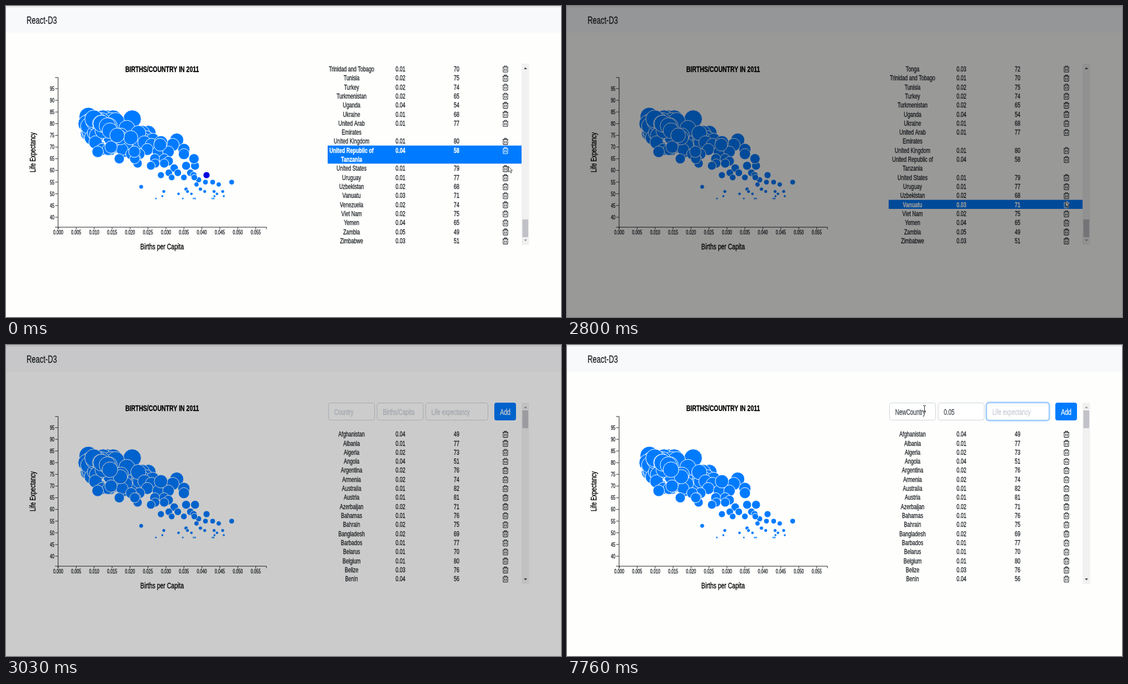
An HTML page with a canvas that plays this animation: 999x561 px, repeating every 8 s.

```html
<!DOCTYPE html>
<html lang="en">
<head>
<meta charset="utf-8">
<title>Births per country</title>
<style>
  html, body { margin: 0; width: 100%; height: 100%; overflow: hidden; background: #fefefd; }
  canvas { display: block; }
</style>
</head>
<body>
<canvas id="stage" width="999" height="561"></canvas>
<script>
const ctx = document.getElementById('stage').getContext('2d');
const LOOP = 8000, CONDENSED = 0.72, LINE = 16.32;
const BLUE = '#007bff', INK = '#212529';
const DELETE_AT = 2260, SCENE_AT = 2890, KEYS_ON = 4160, KEYS_OFF = 5730;

// name, births per thousand, life expectancy; "/" breaks the line
const parse = text => text.trim().split('\n').map(line => {
  const [name, births, life] = line.trim().split(',');
  return { name, lines: name.split('/'), births: +births, life: +life };
});
const firstRows = parse(`Afghanistan,43.5,49
  Albania,12.8,77
  Algeria,20.5,73
  Angola,43.4,51
  Argentina,17.1,76
  Armenia,15.1,74
  Australia,13.7,82
  Austria,9.2,81
  Azerbaijan,18.3,71
  Bahamas,14.9,76
  Bahrain,19,75
  Bangladesh,20.3,69
  Barbados,12,77
  Belarus,11.5,70
  Belgium,11.8,80
  Belize,25.1,76
  Benin,39.1,56`);
const lastRows = parse(`Tonga,28.6,72
  Trinidad and Tobago,14.7,70
  Tunisia,17.5,75
  Turkey,17.3,74
  Turkmenistan,21.3,65
  Uganda,44.7,54
  Ukraine,11,68
  United Arab/Emirates,12.4,77
  United Kingdom,12.1,80
  United Republic of/Tanzania,41.3,58
  United States,13.7,79
  Uruguay,14.4,77
  Uzbekistan,21.2,68
  Vanuatu,28.4,71
  Venezuela,20.2,74
  Viet Nam,16.4,75
  Yemen,37.8,65
  Zambia,46.1,49
  Zimbabwe,29.4,51`);
const afterDelete = lastRows.filter(r => r.name !== 'Venezuela');
const removedLater = ['Uzbekistan', 'Vanuatu', 'Venezuela', 'Viet Nam', 'Yemen'];
const remaining = lastRows.filter(r => !removedLater.includes(r.name));

// each group: life expectancy followed by birth rates
const expand = groups => groups.flatMap(([life, ...rates]) => rates.map(births => ({ births, life })));
const longLived = expand([
  [83, 8.4], [82, 20.6, 15.3, 12.5], [81, 9, 14.6, 16, 12], [80, 7.9, 9.4], [76, 8.3],
]);
const shortLived = expand([
  [82, 9.9], [80, 11.9], [78, 19.1], [75, 10.7], [76, 22.3],
  [73, 26.3, 33], [72, 10.4, 24], [71, 26, 31.9, 18.9],
  [69, 12.2, 13.9, 17.8, 35, 24.8], [68, 27.8, 30.7], [67, 22.6, 20.3, 35],
  [65, 17, 21.6, 26.9, 29.5], [64, 30.7], [63, 22.1, 27, 29.5], [62, 25.8, 35.6, 38.1],
  [61, 32.3], [59, 30.8, 33.3, 36.8], [58, 28.6, 37.7], [57, 31.6, 35, 37.9],
  [55, 41, 43, 48.3], [54, 38.5], [53, 23.1], [52, 35.6, 39.6], [51, 36, 40.8, 45.8],
  [50, 33.5, 37.1, 44.2], [49, 29], [48, 27.2, 34.7, 37.7, 38.1, 42.9, 43.3],
]);
let seed = 11;
const random = () => (seed = seed * 16807 % 2147483647) / 2147483647;
const crowd = Array.from({ length: 55 }, () => {
  const births = 8.5 + 16 * random();
  const low = Math.max(68, 76 - 1.7 * (births - 8)), high = births < 15 ? 81 : 76;
  return { births, life: Math.round(low + (high - low) * random()) };
});
const backCircles = [...firstRows, ...longLived, ...crowd, ...shortLived];

const chartX = births => 94 + births * 6.464;
const chartY = life => 149 + (95 - life) * 4.218;

function text(str, x, y, size, { align = 'center', color = INK, weight = 400, turn = 0 } = {}) {
  ctx.save();
  ctx.translate(x, y);
  ctx.rotate(turn);
  ctx.scale(CONDENSED, 1);
  ctx.font = `${weight} ${size}px "Liberation Sans", Arial, sans-serif`;
  ctx.textAlign = align;
  ctx.fillStyle = ctx.strokeStyle = color;
  ctx.lineWidth = 0.35;
  ctx.fillText(str, 0, 0);
  ctx.strokeText(str, 0, 0);
  const width = ctx.measureText(str).width * CONDENSED;
  ctx.restore();
  return width;
}
function rect(x, y, w, h, color) {
  ctx.fillStyle = color;
  ctx.fillRect(x, y, w, h);
}
function roundRect(x, y, w, h, r, fill, stroke, width = 1) {
  ctx.beginPath();
  ctx.roundRect(x, y, w, h, r);
  if (fill) { ctx.fillStyle = fill; ctx.fill(); }
  if (stroke) { ctx.strokeStyle = stroke; ctx.lineWidth = width; ctx.stroke(); }
}
function shape(path, x, y, fill, stroke, width = 1) {
  ctx.save();
  ctx.translate(x, y);
  const p = new Path2D(path);
  if (fill) { ctx.fillStyle = fill; ctx.fill(p); }
  if (stroke) { ctx.strokeStyle = stroke; ctx.lineWidth = width; ctx.stroke(p); }
  ctx.restore();
}
const clamp = v => Math.max(0, Math.min(1, v));

// linear interpolation along [time, x, y] points
function along(points, t) {
  const next = points.findIndex(p => p[0] > t);
  if (next < 0) return points.at(-1).slice(1);
  if (next === 0) return points[0].slice(1);
  const [a, b] = [points[next - 1], points[next]];
  const k = (t - a[0]) / (b[0] - a[0]);
  return [a[1] + (b[1] - a[1]) * k, a[2] + (b[2] - a[2]) * k];
}
const deletePath = [[0, 904, 289], [430, 904, 289], [1230, 899, 347], [1560, 896, 356],
  [2760, 896, 356], [2860, 898, 346]];
const formPath = [[3200, 994, 322], [3330, 900, 262], [3460, 760, 180], [3590, 643, 115]];

function drawHeader() {
  rect(0, 0, 999, 561, '#fefefd');
  rect(0, 1, 999, 47, '#f8f9fb');
  rect(0, 1, 999, 1, '#d2d3d5');
  text('React-D3', 37, 32, 18, { align: 'left' });
}

function drawChart(circles, hovered) {
  text('BIRTHS/COUNTRY IN 2011', 281, 119, 14.6, { weight: 700, color: '#000' });
  text('Births per Capita', 281, 438.5, 14.6, { color: '#000' });
  text('Life Expectancy', 52.5, 264, 14.2, { color: '#000', turn: -Math.PI / 2 });
  shape('M-5 .5H.5V270.5H-5M.5 274V270.5H375.5V274', 93.3, 128.5, null, '#222');
  for (let life = 40; life <= 95; life += 5) {
    const y = chartY(life);
    rect(88.5, y - 0.5, 5, 1, '#333');
    text(life, 87, y + 3.8, 10, { align: 'right' });
  }
  for (let births = 0; births <= 55; births += 5) {
    const x = chartX(births);
    rect(x - 0.5, 399, 1, 4, '#333');
    text((births / 1000).toFixed(3), x, 411.5, 10);
  }
  for (const c of circles) {
    ctx.beginPath();
    ctx.arc(chartX(c.births), chartY(c.life), 1.9 + (c.life - 48) * 0.42, 0, 7);
    ctx.fillStyle = c === hovered ? '#0000e0' : BLUE;
    ctx.fill();
    ctx.strokeStyle = '#fff';
    ctx.lineWidth = 1;
    ctx.stroke();
  }
}

function layout(rows, firstCenter) {
  let y = firstCenter;
  return rows.map(row => {
    const placed = { row, y, top: y - LINE / 2 - 0.5, height: row.lines.length * LINE };
    y += placed.height;
    return placed;
  });
}

function drawTable(placed, hovered) {
  ctx.save();
  ctx.beginPath();
  ctx.rect(579, 106, 349, 325);
  ctx.clip();
  for (const { row, y, top, height } of placed) {
    const active = row === hovered;
    const style = active ? { color: '#fff', weight: 700 } : {};
    if (active) rect(579, top, 349, height, BLUE);
    row.lines.forEach((line, i) => text(line, 622, y + i * LINE + 4.4, 12.5, style));
    text((row.births / 1000).toFixed(2), 710, y + 4.4, 12.5, style);
    text(row.life, 811, y + 4.4, 12.5, style);
    shape('M-5 -3.5H5M-2 -4V-5.5H2V-4M-4 -3V4.5Q-4 5.5 -3 5.5H3Q4 5.5 4 4.5V-3M-1.4 -1V3.4M1.4 -1V3.4',
      899, y + 0.3, null, active ? '#fff' : INK, 1.1);
  }
  ctx.restore();
}

function drawScrollbar(thumbY, atTop) {
  rect(928, 104, 13.5, 327, '#f1f1f2');
  rect(929.5, thumbY, 10.5, 32, '#c1c1c8');
  shape('M-3 2L0 -1.5L3 2Z', 935, 112, atTop ? '#a3a3a3' : '#505050');
  shape('M-3 -2L0 1.5L3 -2Z', 935, 423, atTop ? '#505050' : '#a3a3a3');
}

const typed = (word, times, t) => word.slice(0, times.filter(at => t >= at).length);
const fields = [
  { x: 580, w: 84, hint: 'Country', word: 'NewCountry', from: 3600, to: 5960, blinks: [[3900, 4160]],
    times: [4400, 4600, 4830, 5030, 5200, 5400, 5460, 5530, 5600, 5660] },
  { x: 667.5, w: 84, hint: 'Births/Capita', word: '0.05', from: 5960, to: 7500,
    blinks: [[6230, 6500], [7260, 7500]], times: [6500, 6600, 6760, 7030] },
  { x: 755, w: 113, hint: 'Life expectancy', word: '', from: 7500, to: LOOP,
    blinks: [[7760, LOOP]], times: [] },
];

function drawForm(t) {
  for (const f of fields) {
    const focused = t >= f.from && t < f.to;
    const glow = focused ? clamp((t - f.from) / 120) : t >= f.to ? 1 - clamp((t - f.to) / 100) : 0;
    if (glow) roundRect(f.x - 0.5, 103.5, f.w + 1, 33, 5, null, `rgba(0,123,255,${0.27 * glow})`, 3);
    roundRect(f.x + 0.5, 104.5, f.w - 1, 31, 4, '#fff', '#ced4da');
    if (glow) roundRect(f.x + 0.5, 104.5, f.w - 1, 31, 4, null, `rgba(128,189,255,${glow})`);
    const value = typed(f.word, f.times, t), left = f.x + 10.8;
    const width = text(value || f.hint, left, 126, 13.8,
      { align: 'left', color: value ? '#495057' : '#c8ced6' });
    const hidden = f.blinks.some(([off, on]) => t >= off && t < on);
    if (focused && !hidden) rect(Math.round(left + (value ? width : 0)), 110, 1, 20, '#333');
  }
  roundRect(879, 104, 39, 32, 4, BLUE);
  text('Add', 898.5, 126, 14.6, { color: '#fff' });
}

function drawKey() {
  rect(437, 0, 104, 62, '#929293');
  roundRect(460, -10, 59, 60, 6, '#fff');
  ctx.font = '700 50px "Liberation Sans", Arial, sans-serif';
  ctx.textAlign = 'center';
  ctx.fillStyle = '#8c8c8c';
  ctx.fillText('a', 489.5, 38);
}

function drawCursor(kind, x, y) {
  if (kind === 'hand') {
    shape('M-1 1Q0 -1 1.2 1V6L6 7Q7 8 6.6 11L5.5 15H-.5L-4 10Q-4 8 -1 10Z', x, y, '#fff', '#333');
  } else if (kind === 'beam') {
    shape('M-2.5 -5.5H-.5L0 -5L.5 -5.5H2.5M0 -5V5M-2.5 5.5H-.5L0 5L.5 5.5H2.5', x + 0.5, y, null, '#333');
  } else {
    shape('M.5 .5V10.5L2.8 8.4L4.5 12.2L6.2 11.4L4.6 7.8H7.6Z', x, y, '#fff', '#333', 0.9);
  }
}

// fade to black and back, five steps each way at 30 steps a second
function drawFade(t) {
  const step = Math.floor((t + 10) * 0.03);
  const darkness = clamp(1 - Math.abs(step - 87) / 5);
  if (darkness) rect(0, 0, 999, 561, `rgba(0,0,0,${darkness})`);
}

function draw(t) {
  const formScene = t >= SCENE_AT;
  const [x, y] = along(formScene ? formPath : deletePath, t);
  // the hovered row lags behind the pointer at the start and after the click
  const hoverY = formScene ? y : t < 30 ? 275 : t >= DELETE_AT ? 358 : y;
  const rows = formScene ? firstRows : t < DELETE_AT ? lastRows : afterDelete;
  const lineCount = rows.reduce((n, r) => n + r.lines.length, 0);
  const placed = layout(rows, formScene ? 160.8 : 423.6 - (lineCount - 1) * LINE);
  const over = x < 928 && (!formScene || t >= 3200)
    ? placed.find(p => hoverY >= p.top && hoverY < p.top + p.height) : null;
  const hovered = over && over.row;

  drawHeader();
  const frontCircles = formScene ? remaining : rows;
  drawChart([...backCircles, ...frontCircles], t >= DELETE_AT && !formScene ? null : hovered);
  drawTable(placed, hovered);
  drawScrollbar(formScene ? 118 : 385, formScene);
  if (formScene) drawForm(t);
  if (t >= KEYS_ON && t < KEYS_OFF) drawKey();

  if (!formScene) drawCursor(t >= 1260 && t < 2800 ? 'hand' : 'arrow', x, y);
  else if (t >= 3200) drawCursor(t >= 3550 ? 'beam' : 'arrow', x, y);

  drawFade(t);
}

const start = performance.now();
function tick() {
  draw((performance.now() - start) % LOOP);
  requestAnimationFrame(tick);
}
tick();
</script>
</body>
</html>
```
